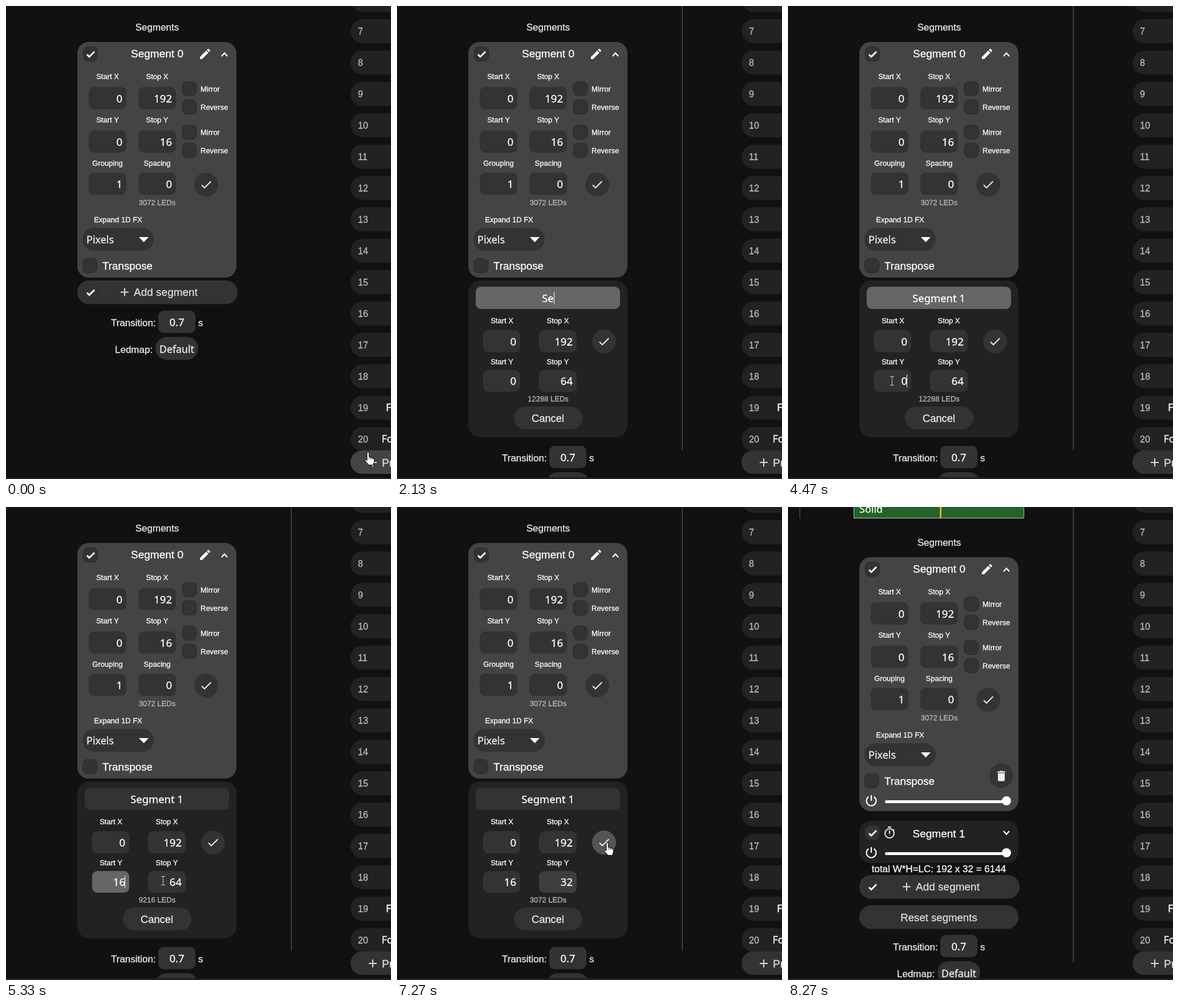
These frames come from a looping animation (675x829 px, 8.4 s). An HTML page with a canvas:

```html
<!DOCTYPE html>
<html lang="en">
<head>
<meta charset="utf-8">
<title>Segments</title>
<style>
html, body { margin: 0; width: 100%; height: 100%; overflow: hidden; background: #111; }
canvas { display: block; width: 100vw; height: 100vh; }
</style>
</head>
<body>
<canvas id="stage" width="675" height="829"></canvas>
<script>
const g = document.getElementById('stage').getContext('2d', { alpha: false });
const LOOP = 8400, OPEN = 600, SAVE = 7400;
const SANS = '"Liberation Sans", Arial, sans-serif';
const UI = '"Noto Sans", "Open Sans", sans-serif';

const PENCIL = new Path2D('M3 17.25V21h3.75L17.81 9.94l-3.75-3.75zM20.71 7.04a1 1 0 0 0 0-1.41l-2.34-2.34a1 1 0 0 0-1.41 0l-1.83 1.83 3.75 3.75z');
const TRASH = new Path2D('M6 19c0 1.1.9 2 2 2h8c1.1 0 2-.9 2-2V7H6zM19 4h-3.5l-1-1h-5l-1 1H5v2h14z');
const TICK = new Path2D('M9 16.17 4.83 12l-1.42 1.41L9 19 21 7l-1.41-1.41z');
const HAND = new Path2D('M4 2.8a1.8 1.8 0 0 1 3.6 0V9.5l6 1.4q3 .7 3 3.2v3.6L14.5 23.5H7L1 16.5q-1-2 .8-2.6 1 0 2.2 1.6z');

// Pointer stops: time, x, y
const PATH = [
  [70, 634, 782], [470, 316, 505], [670, 313, 508], [930, 313, 508], [1470, 322, 510],
  [3470, 324, 510], [3600, 300, 556], [3800, 246, 622], [4060, 175, 652], [4270, 182, 657],
  [4470, 182, 657], [4730, 232, 657], [5130, 230, 642], [5330, 275, 655], [5670, 271, 656],
  [5730, 271, 656], [5930, 366, 657], [6330, 366, 648], [6930, 368, 588], [7450, 368, 588],
  [8000, 373, 562], [8250, 116, 834]
];
const HIDDEN = [[1930, 3470], [4870, 5130], [6070, 6330], [8250, LOOP]];
const DRAGS = [[4470, 4870], [5730, 6070]];
const FIELDS = [[138, 492, 253, 39], [151, 568, 65, 39], [249, 568, 66, 39], [151, 638, 65, 38], [249, 638, 66, 38]];

const ramp = (t, a, b) => Math.min(1, Math.max(0, (t - a) / (b - a)));
const ease = k => k * k * (3 - 2 * k);
const pulse = (t, a, b, c, d) => ramp(t, a, b) - ramp(t, c, d);
const within = (t, spans) => spans.some(([a, b]) => t >= a && t < b);
const grey = v => { v = Math.round(v); return `rgb(${v},${v},${v})`; };
const fade = (from, to, k) => grey(from + (to - from) * k);

function box(x, y, w, h, r, fill, edge) {
  g.beginPath();
  g.roundRect(x, y, w, h, r);
  g.fillStyle = fill;
  g.fill();
  if (edge) { g.strokeStyle = edge; g.lineWidth = 1; g.stroke(); }
}

function disc(x, y, r, fill) {
  g.beginPath();
  g.arc(x, y, r, 0, 7);
  g.fillStyle = fill;
  g.fill();
}

function line(pts, color, width) {
  g.beginPath();
  for (let i = 0; i < pts.length; i += 2) g.lineTo(pts[i], pts[i + 1]);
  g.strokeStyle = color;
  g.lineWidth = width;
  g.stroke();
}

// A hairline stroke gives the type a slightly heavier cut
function text(s, x, y, size, align = 'center', color = '#fff', face = SANS, weight = 400) {
  g.font = `${weight} ${size}px ${face}`;
  g.textAlign = align;
  g.fillStyle = g.strokeStyle = color;
  g.lineWidth = .3;
  g.fillText(s, x, y);
  g.strokeText(s, x, y);
  return g.measureText(s).width;
}

function icon(path, x, y, color) {
  g.save();
  g.translate(x, y);
  g.fillStyle = color;
  g.fill(path);
  g.restore();
}

function checkbox(x, y, on) {
  box(x - 12.5, y - 12.5, 25, 25, 8, '#333', '#292929');
  if (on) line([x - 6, y + 1, x - 2, y + 5, x + 7, y - 4], '#fff', 3);
}

function tickButton(x, y, fill) {
  disc(x, y, 21, fill);
  icon(TICK, x - 12, y - 12, '#eee');
}

function number(x, y, w, value, fill = '#333', h = 39) {
  box(x, y, w, h, 9, fill);
  text(value, x + w - 7, y + h - 12.5, 18.5, 'right', '#fff', UI, 500);
}

function chevron(x, y, d) {
  line([x - 5, y - 3 * d, x, y + 2.5 * d, x + 5, y - 3 * d], '#fff', 2.2);
}

function plus(x, y, color) {
  line([x - 7, y, x + 7, y], color, 2);
  line([x, y - 7, x, y + 7], color, 2);
}

function power(y) {
  g.beginPath();
  g.arc(146, y, 8.5, -1, 4.14);
  g.strokeStyle = '#fff';
  g.lineWidth = 2.2;
  g.stroke();
  line([146, y - 10, 146, y], '#fff', 2.2);
  box(170, y - 1, 215, 5, 2.5, '#fff');
  disc(383, y, 8, '#fff');
}

function presets(t) {
  for (let n = 6; n <= 20; n++) {
    const y = 44 + (n - 7) * 55;
    box(604, y - 21, 120, 42, 21, '#222');
    text(n, 617, y + 6, 16, 'left', '#bbb');
  }
  text('F', 666, 710, 18, 'left', '#fff', UI, 500);
  text('Fo', 658.5, 765, 18, 'left', '#fff', UI, 500);
  box(604, 779, 120, 41, 20.5, fade(68, 51, ramp(t, 100, 300)));
  plus(643, 800, '#ddd');
  text('Pr', 659, 807, 19, 'left', '#ddd');
}

function effectCard() {
  box(115, -40, 299, 34, 0, '#1d5223');
  g.fillStyle = '#2f7636';
  for (let x = 116; x < 413; x += 3)
    for (let y = -26; y < -7; y += 3) g.fillRect(x, y, 2, 2);
  text('Solid', 125, -15, 18, 'left', '#fff', UI);
  g.fillStyle = '#f0a93a';
  g.fillRect(266, -30, 3, 24);
  g.strokeStyle = '#a9c4a9';
  g.lineWidth = 1;
  g.strokeRect(115.5, -40.5, 298, 35);
}

function segmentZero(listed) {
  text('Segments', 265, 43, 17, 'center', '#eee');
  box(125, 63, 279, listed ? 445 : 413, 20, '#444');
  checkbox(148, 84, true);
  text('Segment 0', 265, 90, 19);
  icon(PENCIL, 337, 72, '#fff');
  chevron(383, 85, -1);

  const rows = [['Start X', '0', 'Stop X', '192', 142], ['Start Y', '0', 'Stop Y', '16', 218], ['Grouping', '1', 'Spacing', '0', 292]];
  rows.forEach(([a, v, b, w, y], i) => {
    const base = 128 + i * 76;
    text(a, 178, base, 13);
    text(b, 265, base, 13);
    number(145, y, 66, v);
    number(232, y, 66, w);
    if (i < 2) ['Mirror', 'Reverse'].forEach((s, j) => {
      const cy = 145 + i * 76 + j * 32;
      checkbox(321.5, cy, false);
      text(s, 341, cy + 5, 13, 'left');
    });
  });
  tickButton(351, 313, '#333');
  text('3072 LEDs', 265, 349, 13, 'center', '#bbb');
  text('Expand 1D FX', 196.5, 379, 13);
  box(134, 389, 125, 40, 20, '#333');
  text('Pixels', 141, 416, 18, 'left', '#eee', UI);
  g.beginPath();
  g.moveTo(233, 405); g.lineTo(250, 405); g.lineTo(241.5, 414);
  g.fillStyle = '#fff';
  g.fill();
  checkbox(147, 455, false);
  text('Transpose', 169, 462, 18.8, 'left');
  if (listed) {
    disc(374, 446, 21, '#333');
    icon(TRASH, 362, 434.5, '#eee');
    power(490);
  }
}

function segmentOne() {
  box(125, 525, 279, 74, 20, '#222');
  checkbox(148, 546, true);
  g.beginPath();
  g.arc(178, 547, 8, 0, 7);
  g.strokeStyle = '#eee';
  g.lineWidth = 2;
  g.stroke();
  line([175, 536, 181, 536], '#eee', 2);
  line([178, 542, 178, 548], '#eee', 2);
  line([184, 540, 186, 542], '#eee', 2);
  text('Segment 1', 264.5, 553.5, 19);
  chevron(383, 546, 1);
  power(581);
  text('total W*H=LC: 192 x 32 = 6144', 264.5, 615, 17);
  box(125, 673, 279, 41.5, 20.5, '#333');
  text('Reset segments', 264.5, 701, 18.6, 'center', '#ddd');
}

function addButton(y, t) {
  box(125, y, 281, 41.5, 20.5, fade(51, 68, pulse(t, 420, 560, OPEN, OPEN + 1)));
  checkbox(148, y + 20.5, true);
  plus(208, y + 20.5, '#ddd');
  text('Add segment', 224, y + 27, 19, 'left', '#ddd');
}

function typedName(t) {
  const marks = [1870, 2130, 2270, 2360, 2450, 2540, 2640, 2730, 2870];
  return 'Segment 1'.slice(0, marks.filter(m => t >= m).length);
}

function caret(x, y) {
  g.fillStyle = '#fff';
  g.fillRect(Math.round(x), y, 1, 22);
}

function form(t) {
  const name = typedName(t);
  const startY = t < 4870 ? '0' : t < 5070 ? '1' : '16';
  const stopY = t < 6070 ? '64' : t < 6270 ? '3' : '32';
  const leds = 192 * (stopY - startY);
  const nameOn = pulse(t, 1000, 1250, 4470, 4730);
  const startOn = pulse(t, 4470, 4730, 5730, 5930);
  const stopOn = pulse(t, 5730, 5930, 7180, 7295);

  box(125, 481, 279, 275, 21, '#222');
  box(138, 492, 253, 39, 9, fade(51, 102, nameOn));
  let w = 0;
  if (name) w = text(name, 264.5, 519, 18.4, 'center', '#fff', UI);
  else text('New segment 1', 264.5, 519, 18, 'center', '#999', UI);
  if (t >= 1000 && t < 4470) caret(264.5 + w / 2, 501);

  text('Start X', 184, 556, 13);
  text('Stop X', 282, 556, 13);
  text('Start Y', 184, 628, 13);
  text('Stop Y', 282, 628, 13);
  number(151, 568, 65, '0');
  number(249, 568, 66, '192');
  number(151, 638, 65, startY, fade(51, 102, startOn), 38);
  number(249, 638, 66, stopY, fade(51, 102, stopOn), 38);
  if (t >= 4470 && t < 5730) caret(208, 646);
  if (t >= 5730 && t < 7200) caret(307, 646);
  tickButton(363, 588, fade(51, 85, ramp(t, 6680, 6900)));
  text(leds > 0 ? leds + ' LEDs' : '(delete)', 265, 693, 13, 'center', '#bbb');
  box(205, 702, 120, 40, 20, '#333');
  text('Cancel', 264.5, 729, 18.4, 'center', '#eee');
}

function footer(y) {
  text('Transition:', 184, y + 27, 17, 'left', '#eee');
  box(267, y, 65, 39, 9, '#333');
  text('0.7', 299.5, y + 26.5, 18.5, 'center', '#fff', UI, 500);
  text('s', 337, y + 27, 17, 'left', '#eee');
  text('Ledmap:', 191, y + 74, 17, 'left', '#eee');
  box(262, y + 46, 75, 40, 20, '#333');
  text('Default', 299.5, y + 73.5, 17.7, 'center', '#eee', UI);
}

function pointer(t, inForm) {
  if (within(t, HIDDEN)) return;
  let i = PATH.findIndex(p => p[0] > t);
  if (i < 0) i = PATH.length - 1;
  const b = PATH[i], a = PATH[Math.max(0, i - 1)];
  const k = a === b ? 0 : ease(ramp(t, a[0], b[0]));
  const x = a[1] + (b[1] - a[1]) * k, y = a[2] + (b[2] - a[2]) * k;
  const overField = inForm && FIELDS.some(([fx, fy, w, h]) => x >= fx && x <= fx + w && y >= fy && y <= fy + h);
  if (overField || within(t, DRAGS)) {
    const cx = Math.round(x) + .5, cy = Math.round(y);
    line([cx, cy - 7, cx, cy + 7], '#ccc', 1);
    for (const d of [-7.5, 7.5]) line([cx - 3.5, cy + d, cx + 3.5, cy + d], '#ccc', 1);
    return;
  }
  g.save();
  g.translate(x - 5, y - 1);
  g.fillStyle = '#fff';
  g.fill(HAND);
  g.strokeStyle = '#000';
  g.lineWidth = 1;
  g.stroke(HAND);
  for (const fx of [8, 11, 14]) line([fx, 11, fx, 14], '#000', .8);
  g.restore();
}

function draw(t) {
  const inForm = t >= OPEN && t < SAVE, listed = t >= SAVE;
  g.fillStyle = '#111';
  g.fillRect(0, 0, 675, 829);

  g.save();
  g.beginPath();
  g.rect(0, 0, 675, 826);
  g.clip();
  presets(t);
  g.fillStyle = fade(17, 72, ramp(t, 640, 930));
  g.fillRect(499.5, 0, 1.5, listed ? 798 : 778);
  if (listed) {
    g.fillStyle = '#444';
    g.fillRect(20, 0, 1.5, 20);
    g.translate(0, 25);
    effectCard();
  }
  segmentZero(listed);
  if (inForm) form(t);
  else {
    if (listed) segmentOne();
    addButton(listed ? 620 : 481, t);
  }
  footer(inForm ? 771 : listed ? 725 : 534);
  g.restore();

  g.fillStyle = '#4a2f24';
  g.fillRect(0, 827, 675, 1);
  pointer(t, inForm);
}

const begin = performance.now();
function tick() {
  draw((performance.now() - begin) % LOOP);
  requestAnimationFrame(tick);
}
tick();
</script>
</body>
</html>
```
